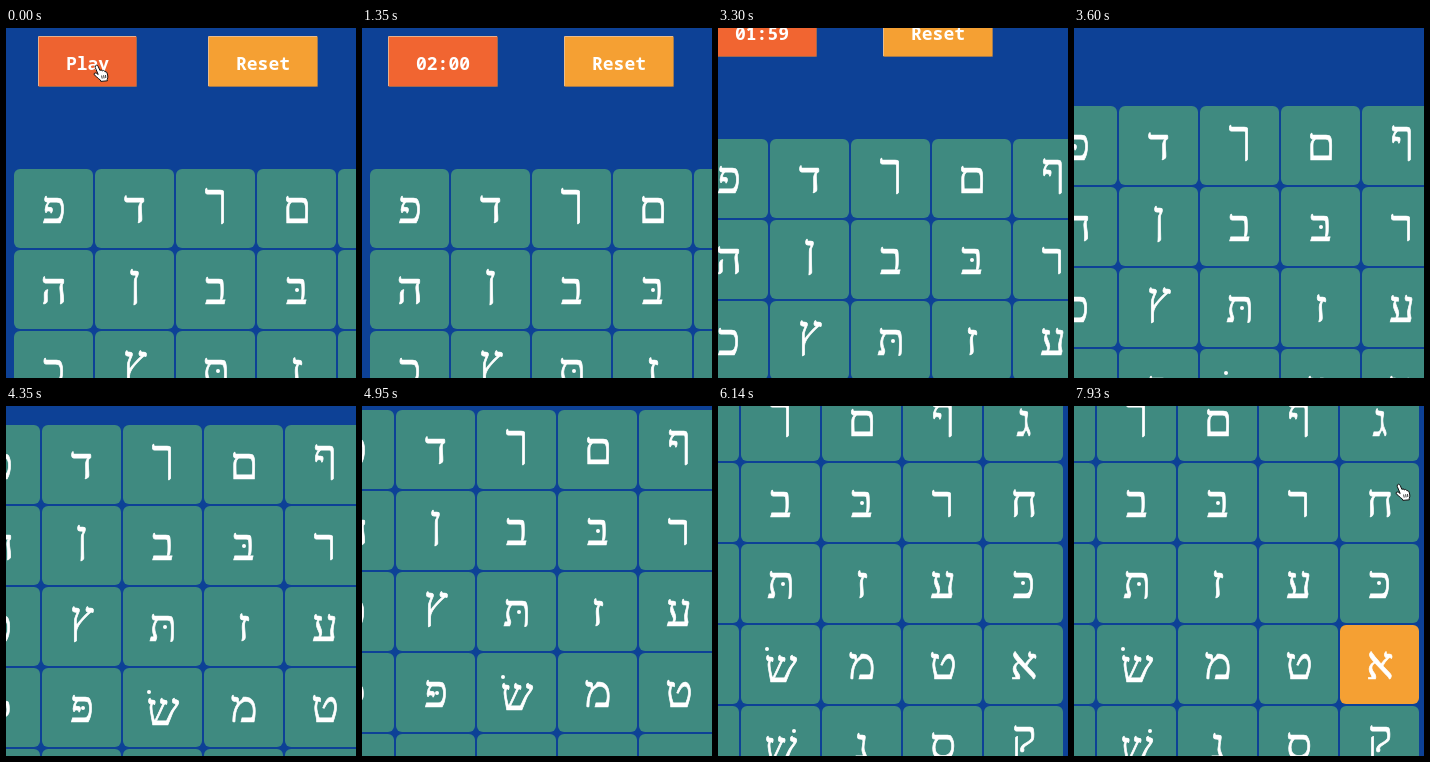
Animation of 350x350 px, one loop 8 s. Source, as an HTML page:

```html
<!DOCTYPE html>
<html lang="en">
<head>
<meta charset="utf-8">
<title>Letter tiles</title>
<style>
  html, body { margin: 0; width: 100%; height: 100%; overflow: hidden; background: #0d4196; }
  svg { display: block; width: 350px; height: 350px; }
  text { fill: #fff; text-anchor: middle; }
  .label { font: 600 18px "Noto Sans Mono", "DejaVu Sans Mono", monospace; }
  .letter { font-family: "Liberation Serif", "DejaVu Sans", serif; stroke: #fff; stroke-width: .7px; }
</style>
</head>
<body>
<svg id="stage" viewBox="0 0 350 350"></svg>
<script>
const LOOP = 8000;
const TEAL = '#3f8a80', AMBER = '#f5a033', RED = '#f16531';
const stage = document.getElementById('stage');

function add(parent, tag, attrs = {}, text = '') {
  const node = document.createElementNS('http://www.w3.org/2000/svg', tag);
  for (const key in attrs) node.setAttribute(key, attrs[key]);
  node.textContent = text;
  return parent.appendChild(node);
}

// Each row holds its value until the time of the next one.
function hold(node, prop, rows) {
  const frames = rows.map(([t, value]) => ({ offset: t / LOOP, [prop]: value, easing: 'steps(1, end)' }));
  frames.push({ offset: 1, [prop]: rows[rows.length - 1][1] });
  node.animate(frames, { duration: LOOP, iterations: Infinity });
}

function move(node, rows) {
  hold(node, 'transform', rows.map(([t, x, y]) => [t, `translate(${x}px, ${y}px)`]));
}

const page = add(stage, 'g');

function button(x, w, fill, label) {
  const g = add(page, 'g');
  const face = add(g, 'rect', { x, y: 8, width: w, height: 51, rx: 2, fill });
  add(g, 'path', { d: `M${x + .5} 58V8.5H${x + w - 1}`, fill: 'none', stroke: '#e9c3a0', 'stroke-opacity': .8 });
  add(g, 'path', { d: `M${x + 1} 58.5H${x + w - .5}V9`, fill: 'none', stroke: '#7d6c62', 'stroke-opacity': .7 });
  const text = add(g, 'text', { x: x + w / 2, y: 41.5, class: 'label' }, label);
  return { g, face, text };
}

const start = button(32, 99, '#ee6330', 'Play');
const full = button(26, 110, RED, '02:00');
const next = add(full.g, 'text', { x: 81, y: 41.5, class: 'label' }, '01:59');
button(202, 110, AMBER, 'Reset');

hold(start.face, 'fill', [[0, '#ee6330'], [600, RED]]);
hold(start.g, 'opacity', [[0, 1], [1350, 0]]);
hold(full.g, 'opacity', [[0, 0], [1350, 1]]);
hold(full.text, 'opacity', [[0, 1], [2250, 0]]);
hold(next, 'opacity', [[0, 0], [2250, 1]]);

// Letter size: final mem stands 27 px tall.
const pen = document.createElement('canvas').getContext('2d');
pen.font = '100px "Liberation Serif", "DejaVu Sans", serif';
const size = 2700 / pen.measureText('\u05dd').actualBoundingBoxAscent;

const letters = ['פדךםףג', 'הןבברח', 'כץתזעכ', 'לפשמטא', 'יצשנסק'];
const lift = { 'ך': 8, 'ן': 8, 'ף': 8, 'ץ': 8, 'ק': 8, 'ש': -3, 'ל': -4 };
const dots = { '1,3': [40, 40], '2,2': [42, 40], '2,5': [39, 39], '3,1': [41, 40], '3,2': [26, 24], '4,2': [53, 25] };
let picked;

letters.forEach((row, r) => [...row].forEach((ch, c) => {
  const g = add(page, 'g', { transform: `translate(${8 + 81 * c} ${141 + 81 * r})` });
  const tile = add(g, 'rect', { width: 79, height: 79, rx: 6, fill: TEAL });
  add(g, 'text', { x: 40, y: 53.5 - (lift[ch] || 0), class: 'letter', 'font-size': size }, ch);
  const dot = dots[[r, c]];
  if (dot) add(g, 'circle', { cx: dot[0], cy: dot[1], r: 2, fill: '#fff' });
  if (ch === 'א') picked = tile;
}));

hold(picked, 'fill', [[0, TEAL], [7340, '#88936a'], [7490, '#d49c45'], [7630, AMBER]]);

move(page, [
  [0, 0, 0], [2850, -9, 0], [3000, -20, -6], [3150, -30, -16], [3300, -37, -30],
  [3450, -41, -47], [3600, -44, -63], [3750, -47, -78], [3900, -49, -91],
  [4050, -51, -103], [4200, -52, -114], [4350, -53, -122], [4500, -54, -128],
  [4650, -54, -132], [4800, -55, -135], [4950, -55, -137], [5100, -55, -140],
  [5400, -62, -148], [5550, -87, -157], [5700, -113, -162], [5850, -132, -165],
  [6000, -143, -165], [6140, -147, -165]
]);

const hand = add(stage, 'g');
add(hand, 'path', {
  d: 'M5.2 10.5L2.3 3.6Q1.8 1.5 3.3 1.2Q4.6 1 5.3 2.7L7 6.6Q7.6 5.4 9 6.2L9.4 7Q10.4 5.8 11.6 7.1L11.9 7.7Q13.6 7.2 14.1 9L14.8 12Q15 14 14.2 15.5L14.4 16.8L7.8 17.4L7.4 16Q5.2 14.8 3.6 12.8L1.2 10.8Q.6 9.3 2.2 8.9Q3.6 8.9 5.2 10.5Z',
  fill: '#fff', stroke: '#111', 'stroke-linejoin': 'round'
});
add(hand, 'path', { d: 'M8.6 11.5L9.2 14.6M10.6 11.2L11.1 14.4M12.5 11L12.8 14', fill: 'none', stroke: '#111', 'stroke-width': .8 });
const arrow = add(stage, 'path', {
  d: 'M1 1V15L4.3 12L6.6 17L9 16L6.8 11H11Z', fill: '#111', stroke: '#fff', 'stroke-linejoin': 'round'
});

move(hand, [
  [0, 87, 36], [150, 89, 35], [300, 97, 31], [450, 110, 25], [600, -50, 0],
  [6440, 227, 144], [6590, 252, 186], [6740, 282, 226], [6890, 300, 250],
  [7340, 299, 260], [7930, 321, 77]
]);
move(arrow, [[0, -50, 0], [600, 133, 18], [750, 160, 9], [900, 188, 0], [1050, -50, 0]]);
</script>
</body>
</html>
```
